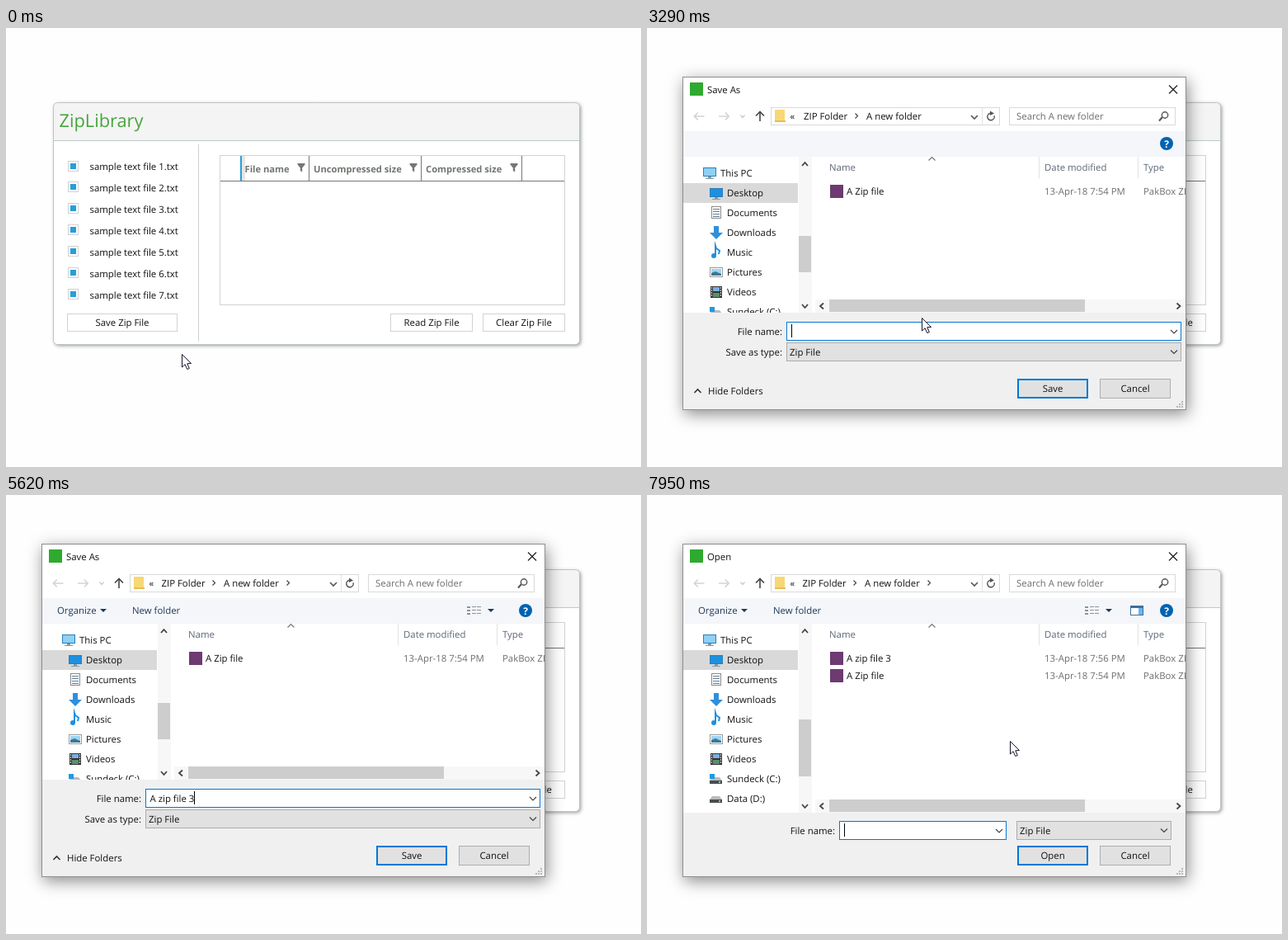
Recreate the animation shown at these times as an HTML page with a canvas. Size 770 px wide and 532 px high, loop 8000 ms.

```html
<!DOCTYPE html>
<html lang="en">
<head>
<meta charset="utf-8">
<title>Saving and reading a zip file</title>
<style>
html, body { margin: 0; width: 100%; height: 100%; overflow: hidden; background: #fefefe; }
canvas { display: block; }
</style>
</head>
<body>
<canvas id="stage" width="770" height="532"></canvas>
<script>
const ctx = document.getElementById('stage').getContext('2d');
const LOOP = 8000;
const INK = '#111', BLUE = '#25a0da', FOCUS = '#0078d7', GREY = '#d2d2d2', DARK = '#767676';

// ---- drawing helpers ----
function box(x, y, w, h, fill, border, lw = 1) {
  if (fill) { ctx.fillStyle = fill; ctx.fillRect(x, y, w, h); }
  if (border) {
    ctx.strokeStyle = border; ctx.lineWidth = lw;
    ctx.strokeRect(x + lw / 2, y + lw / 2, w - lw, h - lw);
  }
}
function path(points, close) {
  ctx.beginPath();
  for (let i = 0; i < points.length; i += 2) ctx.lineTo(points[i], points[i + 1]);
  if (close) ctx.closePath();
}
function line(color, width, ...points) {
  path(points);
  ctx.strokeStyle = color; ctx.lineWidth = width; ctx.stroke();
}
function shape(color, ...points) {
  path(points, true);
  ctx.fillStyle = color; ctx.fill();
}
function disc(x, y, r, color) {
  ctx.beginPath(); ctx.arc(x, y, r, 0, 7);
  ctx.fillStyle = color; ctx.fill();
}
function text(s, x, y, color = INK, align = 'left', font = '11.4px') {
  ctx.font = font + ' "Open Sans", "Noto Sans", sans-serif';
  ctx.textAlign = align; ctx.fillStyle = color;
  ctx.fillText(s, x, y);
}
const textWidth = s => (ctx.font = '11.4px "Open Sans", "Noto Sans", sans-serif', ctx.measureText(s).width);
const chevronY = (x, y, r, d, color = '#444', w = 1.2) => line(color, w, x - r, y - d / 2, x, y + d / 2, x + r, y - d / 2);
const chevronX = (x, y, r, d, color = '#444', w = 1.2) => line(color, w, x - d / 2, y - r, x + d / 2, y, x - d / 2, y + r);
const dropArrow = (x, y) => shape('#1e395b', x - 4, y - 2, x + 4, y - 2, x, y + 2);
function shadow(color, blur, dx, dy) {
  ctx.shadowColor = color; ctx.shadowBlur = blur;
  ctx.shadowOffsetX = dx; ctx.shadowOffsetY = dy;
}
const noShadow = () => shadow('transparent', 0, 0, 0);
function grip(x, y) {
  for (let i = 0; i < 3; i++)
    for (let j = 2 - i; j < 3; j++) box(x + j * 3, y + i * 3, 2, 2, '#b8b8b8');
}

// ---- main panel ----
const rows = [[2, 500, 810], [3, 1050, 1260], [4, 1590, 1740], [6, 2120, 2340]];

function button(label, x, w, hover, pressed) {
  box(x, 346, w, 22, pressed ? BLUE : hover ? '#d6d4d4' : '#fff', pressed ? DARK : GREY);
  text(label, x + w / 2, 361, pressed ? '#fff' : INK, 'center');
}
function funnel(x) {
  shape(DARK, x, 164, x + 9, 164, x + 9, 165.5, x + 5.7, 169.5, x + 5.7, 174.5, x + 3.3, 173, x + 3.3, 169.5, x, 165.5);
}
function panel(t) {
  ctx.beginPath(); ctx.roundRect(57.5, 90.5, 638, 293, 5);
  shadow('rgba(70,85,70,.6)', 4, 1.5, 1.5);
  ctx.fillStyle = '#fff'; ctx.fill();
  noShadow();
  ctx.save(); ctx.clip();
  box(57, 90, 640, 46, '#f4f4f4');
  box(57, 136, 640, 1, '#bccac8');
  ctx.restore();
  ctx.strokeStyle = '#bfc5bf'; ctx.lineWidth = 1;
  ctx.beginPath(); ctx.roundRect(57.5, 90.5, 638, 293, 5); ctx.stroke();
  text('ZipLibrary', 64.5, 120, '#45a63c', 'left', '21.8px');
  box(233, 141, 1, 239, '#cfcfcf');

  for (let i = 0; i < 7; i++) {
    const y = Math.floor(161 + 25.9 * i);
    const k = rows.findIndex(r => r[0] === i);
    const [, enter, click] = rows[k] || [0, LOOP, LOOP];
    const leave = k < 3 ? rows[k + 1][2] : 3040;
    box(75, y, 13, 13, '#fff', t >= enter && t < leave ? '#555' : GREY);
    if (t < click) box(78, y + 3, 7, 7, BLUE);
    text(`sample text file ${i + 1}.txt`, 101.5, 172 + 26 * i);
  }

  box(259, 154, 419, 182, '#fff', GREY);
  box(260, 185, 417, 1, DARK);
  box(284, 155, 2, 30, BLUE);
  box(286, 155, 4, 30, '#e6e6e6');
  for (const x of [367, 503, 625]) box(x, 155, 1, 30, DARK);
  [['File name', 289.5, 353.5], ['Uncompressed size', 373, 489.5], ['Compressed size', 509, 611.5]].forEach(([s, x, fx]) => {
    text(s, x, 175, '#6f766f', 'left', 'bold 11.2px');
    funnel(fx);
  });
  button('Save Zip File', 74, 134, t >= 2740 && t < 3040, t >= 3040 && t < 3290);
  button('Read Zip File', 466, 100, t >= 7200, t >= 7400);
  button('Clear Zip File', 578, 100);
}

// ---- sidebar ----
function monitor(x, y, color) {
  box(x, y, 16, 11, color, '#2b7fb8');
  box(x + 6, y + 11, 4, 2, '#8a9aa5');
  box(x + 3, y + 13, 10, 1, '#8a9aa5');
}
function drive(x, y) {
  shape('#b9bcbf', x + 3, y + 5, x + 12, y + 5, x + 15, y + 9, x, y + 9);
  box(x, y + 9, 15, 4, '#4a4d50');
  box(x + 11, y + 10, 2, 2, '#7ad38b');
}
const places = [
  ['This PC', (x, y) => monitor(x - 8, y + 1, '#8fd0f5')],
  ['Desktop', (x, y) => monitor(x, y + 2, '#1e90e0')],
  ['Documents', (x, y) => {
    box(x + 2, y, 12, 15, '#fff', '#8a8a8a');
    for (let i = 0; i < 4; i++) box(x + 4, y + 3 + 3 * i, 8, 1, '#5f7d96');
  }],
  ['Downloads', (x, y) => shape('#2f8fdc', x + 5, y, x + 11, y, x + 11, y + 8, x + 16, y + 8, x + 8, y + 16, x, y + 8, x + 5, y + 8)],
  ['Music', (x, y) => {
    disc(x + 5, y + 12, 3, '#1e90e0');
    line('#1e90e0', 2, x + 7, y + 12, x + 7, y, x + 8, y + 3, x + 12, y + 6, x + 11, y + 10);
  }],
  ['Pictures', (x, y) => {
    box(x, y + 2, 16, 12, '#fff', '#9a9a9a');
    box(x + 2, y + 4, 12, 8, '#9fd4f3');
    shape('#3d7796', x + 2, y + 12, x + 2, y + 9, x + 7, y + 7, x + 14, y + 10, x + 14, y + 12);
  }],
  ['Videos', (x, y) => {
    box(x + 1, y + 1, 14, 14, '#333');
    box(x + 4, y + 2, 8, 5, '#79aee0');
    box(x + 4, y + 9, 8, 5, '#5b8f6c');
    for (let i = 0; i < 4; i++) { box(x + 2, y + 2 + 3 * i, 1, 2, '#ddd'); box(x + 13, y + 2 + 3 * i, 1, 2, '#ddd'); }
  }],
  ['Sundeck (C:)', (x, y) => { drive(x, y + 1); box(x, y + 2, 6, 6, '#1e9be0'); }],
  ['Data (D:)', drive]
];
function sidebar(bottom, thumbTop, thumbHeight) {
  box(44, 188, 139, 24, '#d9d9d9');
  places.slice(0, bottom > 350 ? 9 : 8).forEach(([name, icon], i) => {
    const y = 176 + 24 * i;
    icon(76, y - 8);
    text(name, i ? 97 : 89, y + 4);
  });
  box(184, 156, 16, bottom - 156, '#f7f7f7');
  box(184, thumbTop, 15, thumbHeight, '#cdcdcd');
  chevronY(191.5, 165, 3.5, -4, '#444', 1.8);
  chevronY(191.5, bottom - 8, 3.5, 4, '#444', 1.8);
}

// ---- file dialog ----
function fileList(files, bottom) {
  const head = '#5d6779';
  text('Name', 221, 173, head);
  text('Date modified', 482, 173, head);
  text('Type', 602, 173, head);
  for (const x of [475, 595]) box(x, 156, 1, 26, '#e2e2e2');
  chevronY(345.5, 158.5, 4, -4, '#777');
  ctx.save();
  ctx.beginPath(); ctx.rect(44, 156, 609, 200); ctx.clip();
  files.forEach(([name, time], i) => {
    const y = 198 + 21 * i;
    box(222, y - 8, 16, 16, '#6d3a72');
    text(name, 242, y + 4);
    text('13-Apr-18 ' + time, 482, y + 4, '#6d6d6d');
    text('PakBox ZIP', 602, y + 4, '#6d6d6d');
  });
  ctx.restore();
  box(204, bottom - 16, 449, 16, '#f7f7f7');
  box(221, bottom - 16, 310, 15, '#cdcdcd');
  chevronX(212, bottom - 8, 3.5, -4, '#444', 1.8);
  chevronX(644.5, bottom - 8, 3.5, 4, '#444', 1.8);
}
function addressBar(full) {
  for (const [x, d] of [[63.5, -1], [93, 1]]) {
    line('#d0d0d0', 1.4, x - 6, 107, x + 6, 107);
    chevronX(x + 4 * d, 107, 4.5, 4.5 * d, '#d0d0d0', 1.4);
  }
  chevronY(116, 107, 2.5, 3, '#c8c8c8');
  line('#444', 1.6, 137, 113, 137, 101.5);
  chevronY(137, 104, 5, -5, '#444', 1.6);
  box(150, 96, 278, 22, '#fff', '#d9d9d9');
  box(155, 99, 12, 15, '#f8d775');
  box(155, 112, 13, 2, '#e9bd52');
  text('«', 173.5, 110.5);
  text('ZIP Folder', full ? 188.5 : 190, 110.5);
  text('A new folder', full ? 264 : 266, 110.5);
  chevronX(full ? 252 : 254, 106.5, 3, 3);
  if (full) chevronX(342, 106.5, 3, 3);
  chevronY(397, 108, 4, 4, '#555', 1.6);
  box(406, 97, 1, 20, '#e2e2e2');
  ctx.beginPath(); ctx.arc(417, 107.5, 4.2, -.3, 4.7);
  ctx.strokeStyle = '#555'; ctx.lineWidth = 1.5; ctx.stroke();
  shape('#555', 416, 100.5, 421, 103.5, 416, 106);
  box(439, 96, 202, 22, '#fff', '#d9d9d9');
  text('Search A new folder', 448, 110.5, '#6d6d6d');
  ctx.beginPath(); ctx.arc(628, 105.5, 3.7, 0, 7);
  ctx.strokeStyle = '#555'; ctx.lineWidth = 1.4; ctx.stroke();
  line('#555', 2, 625, 108, 621, 112.5);
}
function toolbar(opening) {
  const navy = '#1e395b', x = opening ? 531 : 559;
  text('Organize', 62, 144, navy);
  dropArrow(118, 140);
  text('New folder', 153, 144, navy);
  for (let i = 0; i < 3; i++)
    for (let j = 0; j < 3; j++) box(x + 6 * j, 135 + 4 * i, j ? 5 : 4, j ? 1 : 2, '#8c949c');
  dropArrow(x + 29, 140);
  if (opening) {
    box(586, 134, 16, 12, '#fff', '#3f6f99');
    box(587, 135, 14, 2, '#3f6f99');
    box(596, 137, 5, 8, '#6cb4ec');
  }
}
function combo(x, y, w, label) {
  box(x, y, w, 23, '#e1e1e1', '#adadad');
  text(label, x + 4, y + 16);
  chevronY(x + w - 9, y + 11.5, 4, 4);
}
function input(x, y, w, value) {
  box(x, y, w, 23, '#fff', FOCUS);
  text(value, x + 5.5, y + 15.5);
  box(Math.round(x + 5.5 + textWidth(value)), y + 3, 1, 16, '#000');
  chevronY(x + w - 9, y + 12, 4, 4);
}
function dialog(t, start, opening, value, suggest) {
  const bottom = opening ? 385 : 345;
  const toolsAt = start + (opening ? 160 : 240), crumbsAt = start + (opening ? 300 : 320);
  const age = t - start;
  ctx.save();
  ctx.globalAlpha = Math.min(1, .5 + age / 160);
  shadow('rgba(0,0,0,.45)', 18, 2, 5);
  box(43, 59, 611, 404, '#fff');
  noShadow();
  box(52, 66, 16, 16, '#2eaa2e');
  text(opening ? 'Open' : 'Save As', 73, 79);
  line('#222', 1.2, 633, 69.5, 643, 79.5);
  line('#222', 1.2, 643, 69.5, 633, 79.5);
  addressBar(t >= crumbsAt);
  box(44, 125, 609, 31, '#f4f6f9');
  if (t >= toolsAt) toolbar(opening);
  disc(630, 140, 8, '#0063b1');
  text('?', 630, 144.5, '#fff', 'center', 'bold 12px');
  sidebar(bottom, opening ? 272 : 252, opening ? 69 : 44);
  const saved = ['A Zip file', '7:54 PM'];
  fileList(opening ? [['A zip file 3', '7:56 PM'], saved] : [saved], bottom);

  box(44, bottom, 609, 462 - bottom, '#f0f0f0');
  if (opening) {
    text('File name:', 228, 411, INK, 'right');
    input(233, 395, 203, value);
    combo(448, 395, 188, 'Zip File');
  } else {
    text('File name:', 164, 372, INK, 'right');
    text('Save as type:', 164, 397, INK, 'right');
    input(169, 356, 479, value);
    combo(169, 381, 479, 'Zip File');
    chevronY(61.5, 440, 4, -4, '#333', 1.6);
    text('Hide Folders', 74, 444);
  }
  box(449, 425, 86, 24, '#e1e1e1', FOCUS, 2);
  text(opening ? 'Open' : 'Save', 492, 441, INK, 'center');
  box(549, 425, 86, 24, '#e1e1e1', '#adadad');
  text('Cancel', 592, 441, INK, 'center');
  grip(642, 452);
  box(43, 59, 611, 404, null, '#8f8f8f');
  if (suggest) {
    shadow('rgba(0,0,0,.5)', 4, 2, 2);
    box(172, 376, 456, 40, '#fff');
    noShadow();
    box(172, 376, 456, 40, null, '#646464');
    text('A Zip file.zip', 178, 391);
    grip(617, 405);
  }
  ctx.restore();
}

// ---- timeline ----
const typed = 'A zip file 3';
const keyTimes = [3820, 4130, 4200, 4530, 4740, 4830, 5040, 5130, 5280, 5350, 5440, 5620];
const track = [
  [20, 213, 395], [570, 82, 215], [900, 82, 215], [1120, 82, 245], [1320, 82, 245], [1590, 83, 269],
  [1740, 83, 269], [2110, 83, 331], [2190, 83, 324], [2430, 83, 324], [2890, 104, 357], [3150, 104, 357],
  [3290, 333, 351], [3350, 333, 351], [3590, 312, 325], [3820, 312, 326], [6640, 312, 326],
  [7010, 400, 386], [7330, 491, 361], [7770, 491, 361], [7950, 440, 298]
];
function pointer(t) {
  if (t >= 4130 && t < 5440 || t >= 5620 && t < 6380) return;
  const i = track.findIndex(k => k[0] > t);
  const b = track[i < 0 ? track.length - 1 : i], a = i > 0 ? track[i - 1] : b;
  const p = a === b ? 0 : (t - a[0]) / (b[0] - a[0]), e = p * p * (3 - 2 * p);
  ctx.save();
  ctx.translate(Math.round(a[1] + (b[1] - a[1]) * e) + .5, Math.round(a[2] + (b[2] - a[2]) * e) + .5);
  const arrow = [0, 0, 0, 15.5, 3.6, 12.2, 6.2, 18, 8.8, 17, 6.3, 11.2, 11, 11];
  shape('#fff', ...arrow);
  ctx.strokeStyle = '#15152a'; ctx.lineWidth = 1; ctx.stroke();
  ctx.restore();
}
function draw(t) {
  box(0, 0, 770, 532, '#fefefe');
  panel(t);
  if (t >= 3190 && t < 6380)
    dialog(t, 3190, false, typed.slice(0, keyTimes.filter(k => k <= t).length), t >= 3820 && t < 5440);
  if (t >= 7550) dialog(t, 7550, true, '', false);
  pointer(t);
}

ctx.textRendering = 'geometricPrecision';
const begin = performance.now();
function tick() {
  draw((performance.now() - begin) % LOOP);
  requestAnimationFrame(tick);
}
tick();
</script>
</body>
</html>
```
